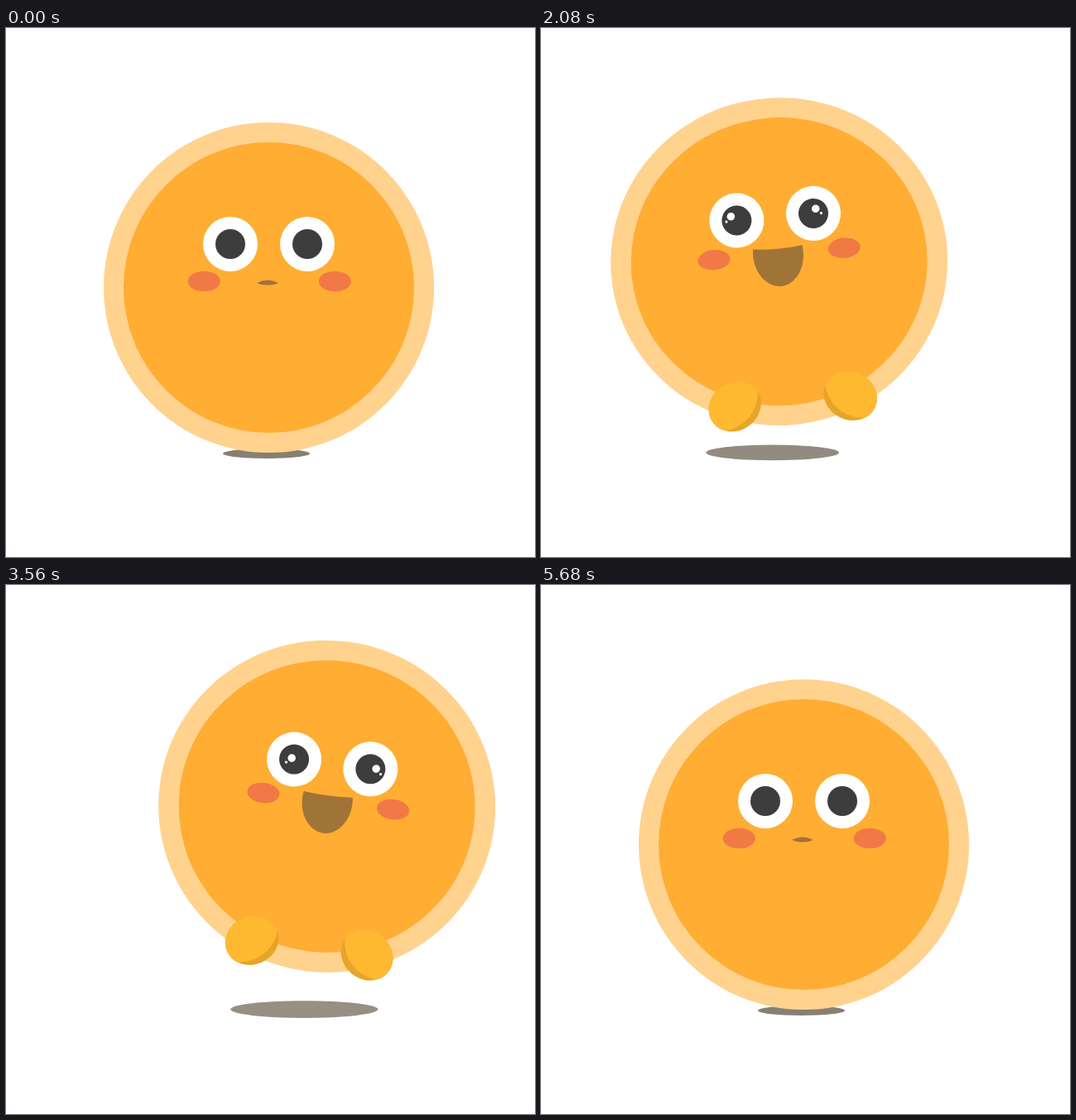
An HTML page with a canvas for the animation above (5.92 s loop, 639x639 px).

```html
<!DOCTYPE html>
<html lang="en">
<head>
<meta charset="utf-8">
<title>Bouncing face</title>
<style>
html, body { margin: 0; width: 100%; height: 100%; overflow: hidden; background: #fff; }
canvas { display: block; width: 639px; height: 639px; }
</style>
</head>
<body>
<canvas id="stage" width="639" height="639"></canvas>
<script>
const ctx = document.getElementById('stage').getContext('2d');
const LOOP = 5920, STEP = 40;
const CENTER = { x: 317.5, y: 313.5 }, RADIUS = 199.5;

// time, x offset, lift, signed lean
const HOP = [
  [1950, 0, 0, 0], [2080, -30, 33, -.67], [2280, -70, 52, -.9], [2560, -86, 61, -1],
  [2680, -86, 57, -.98], [2880, -71, 28.5, -.83], [3100, 0, 0, 0], [3300, 0, 0, 0],
  [3560, 70, 45, .88], [3880, 90.5, 59, 1], [3960, 91, 59, 1], [4360, 56, 36.5, .71],
  [4480, 0, 0, 0]
];
// time, width scale, height scale
const STRETCH = [
  [920, 1, 1], [1200, 1.05, 1.05], [1480, 1, 1], [1520, 1.0025, 1.0025],
  [1700, 1.02, 1], [1950, 1.02, .948], [4480, 1.02, .948], [4680, 1.015, 1.07],
  [4880, 1.005, .99], [5060, 1, 1]
];
const JOY = [[1400, 0], [1520, .5], [1640, 1], [5080, 1], [5660, 0]];
const MARK = [[1420, 0], [1520, .5], [1640, 1], [1840, 1], [1980, 0]];

const mix = (a, b, k) => a + (b - a) * k;

// Monotone cubic interpolation of one column through the keys.
function track(keys, t, col = 1) {
  const last = keys.length - 1;
  if (t <= keys[0][0]) return keys[0][col];
  if (t >= keys[last][0]) return keys[last][col];
  const i = keys.findIndex(k => k[0] > t) - 1;
  const slope = n => (keys[n + 1][col] - keys[n][col]) / (keys[n + 1][0] - keys[n][0]);
  const tangent = n => {
    if (n === 0 || n === last) return 0;
    const a = slope(n - 1), b = slope(n);
    return a * b <= 0 ? 0 : 2 * a * b / (a + b);
  };
  const span = keys[i + 1][0] - keys[i][0], s = (t - keys[i][0]) / span;
  const h = s * s * (3 - 2 * s);
  return mix(keys[i][col], keys[i + 1][col], h)
    + span * s * (1 - s) * ((1 - s) * tangent(i) - s * tangent(i + 1));
}

function oval(x, y, rx, ry, color, turn = 0) {
  ctx.beginPath();
  ctx.ellipse(x, y, rx, ry, turn, 0, Math.PI * 2);
  ctx.fillStyle = color;
  ctx.fill();
}

function drawShadow(lean) {
  const p = Math.abs(lean);
  const color = `rgb(${mix(135, 153, p)},${mix(127, 144, p)},${mix(114, 135, p)})`;
  oval(314.5 + 52 * lean, 514 - 1.6 * p, 52.5 + 41.5 * p, 6 + 5 * p, color);
}

function drawBody(sx, sy) {
  const y = RADIUS * (1 - sy);
  oval(0, y, RADIUS * sx, RADIUS * sy, '#ffd28e');
  oval(0, y, 175.5 * sx, 175.5 * sy, '#ffad33');
}

function drawEye(side, joy, x) {
  const ex = 46.5 * side, ey = -52.5;
  oval(ex, ey, 33, 33, '#fff');
  oval(ex, ey, 18, 18, '#3d3d3d');
  const gx = ex + x * .035, gy = ey + Math.max(0, x) * .06;
  ctx.globalAlpha = joy;
  oval(gx + (side < 0 ? -5.5 : 4.3), gy - 5.4, 4.8, 4.8, '#fff');
  oval(gx + (side < 0 ? -11.5 : 10.5), gy + .5, 1.6, 1.6, '#fff');
  ctx.globalAlpha = 1;
}

function drawMouth(joy) {
  const mid = mix(-1.5, -.3, joy), w = mix(12, 29.8, joy);
  const y = mix(-6, -15.7, joy);
  const top = mix(-9, -14, joy) - 3 * Math.sin(Math.PI * joy);
  const low = mix(-3, 31.6, joy ** .43);
  const bend = y + (low - y) * .55, side = w + 4 * joy;
  ctx.beginPath();
  ctx.moveTo(mid - w, y);
  ctx.quadraticCurveTo(mid, 2 * top - y, mid + w, y);
  ctx.bezierCurveTo(mid + side, bend, mid + w * .6, low, mid, low);
  ctx.bezierCurveTo(mid - w * .6, low, mid - side, bend, mid - w, y);
  ctx.fillStyle = '#a07436';
  ctx.fill();
}

function drawFoot(side, grow) {
  if (grow <= 0) return;
  ctx.save();
  ctx.translate(.8 + side * (81 - 11 * grow), mix(173.5, 171, grow));
  ctx.scale(-side * grow, grow);
  oval(0, 0, 33, 29, '#e6a428', -.55);
  ctx.clip();
  oval(-17, -18, 46, 46, '#ffb931');
  ctx.restore();
}

function drawMark(grow) {
  if (grow <= 0) return;
  ctx.save();
  ctx.translate(428, 225);
  ctx.scale(grow * 2, grow * 2);
  ctx.strokeStyle = '#ee6b33';
  ctx.lineWidth = 9;
  ctx.lineCap = 'round';
  ctx.beginPath();
  ctx.moveTo(18.5, -24);
  ctx.lineTo(27.5, -41.5);
  ctx.restore();
  ctx.save();
  ctx.translate(428, 225);
  ctx.scale(grow * 2, grow * 2);
  ctx.strokeStyle = '#ee6b33';
  ctx.lineCap = 'round';
  ctx.lineWidth = 4.5;
  ctx.beginPath();
  ctx.moveTo(9.3, -12);
  ctx.lineTo(13.5, -20.7);
  ctx.stroke();
  oval(6.8, -7.2, 2.3, 2.3, '#ee6b33');
  ctx.restore();
}

function draw(t) {
  const x = track(HOP, t, 1), lift = track(HOP, t, 2), lean = track(HOP, t, 3);
  const sx = track(STRETCH, t, 1), sy = track(STRETCH, t, 2) + .065 * Math.abs(lean);
  const joy = track(JOY, t);
  const tilt = 8.5 * Math.sign(lean) * Math.abs(lean) ** 1.2;

  ctx.fillStyle = '#fff';
  ctx.fillRect(0, 0, 639, 639);
  drawShadow(lean);
  ctx.save();
  ctx.translate(CENTER.x + x, CENTER.y - lift);
  ctx.rotate(tilt * Math.PI / 180);
  drawBody(sx, sy);
  for (const side of [-1, 1]) {
    oval(79 * side + .8, -7.5, 19.6, 12.2, '#f17946');
    drawEye(side, joy, x);
    drawFoot(side, joy);
  }
  drawMouth(joy);
  ctx.restore();
  drawMark(track(MARK, t));
}

const start = performance.now();
function tick() {
  const t = (performance.now() - start) % LOOP;
  draw(Math.floor(t / STEP) * STEP);
  requestAnimationFrame(tick);
}
tick();
</script>
</body>
</html>
```
